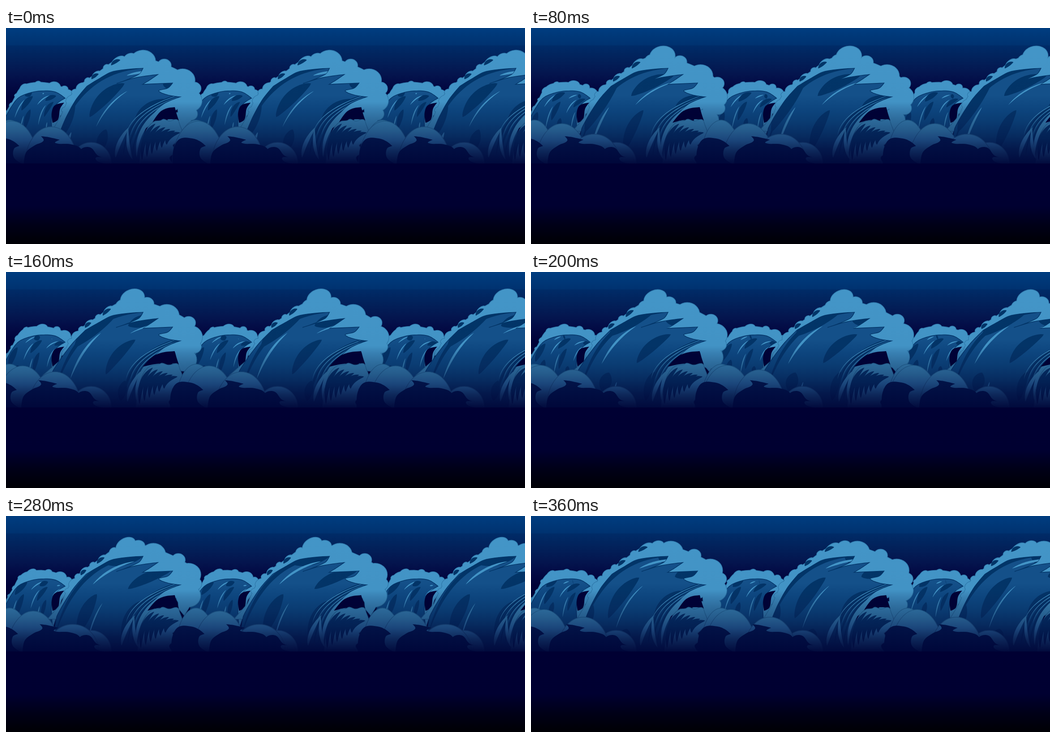
Recreate the animation shown at these times as an HTML page with a canvas. Size 1159 by 483 pixels, loop 400 ms.

```html
<!DOCTYPE html>
<html lang="en">
<head>
<meta charset="utf-8">
<title>Night waves</title>
<style>
  html, body { margin: 0; width: 100%; height: 100%; overflow: hidden; background: #000032; }
  canvas { display: block; }
</style>
</head>
<body>
<canvas id="sea" width="1159" height="483"></canvas>
<script>
const ctx = document.getElementById('sea').getContext('2d');
const W = 1159, H = 483, TILE = 416.4, FLOOR = 303, STEP = 40, COUNT = 10;

const mod = (a, n) => ((a % n) + n) % n;
const clamp = v => Math.max(0, Math.min(1, v));
const mix = (a, b, t) => a + (b - a) * t;
const points = text => text.split(' ').map(s => s.split(',').map(parseFloat));

// Colours depend on height only
function shade(stops, end = FLOOR) {
  const g = ctx.createLinearGradient(0, 0, 0, end);
  stops.forEach(([y, color]) => g.addColorStop(y / end, color));
  return g;
}
const light = shade([[0, '#4496c8'], [165, '#4293c5'], [182, '#387fb1'], [205, '#2d6b9b'], [228, '#255b8b'], [250, '#1b467b'], [275, '#0d2759'], [303, '#020b3d']]);
const edge = shade([[0, '#327eb1'], [165, '#2f79ab'], [205, '#205986'], [240, '#163f70'], [303, '#020b3d']]);
const mid = shade([[0, '#155089'], [150, '#145089'], [180, '#0d457e'], [210, '#0a3b71'], [240, '#072c60'], [270, '#04194c'], [303, '#010a3c']]);
const dark = shade([[0, '#003669'], [165, '#033467'], [210, '#052c60'], [245, '#032154'], [280, '#021144'], [303, '#01093a']]);
const deep = shade([[0, '#031548'], [245, '#021347'], [303, '#00073a']]);
const sky = shade([[0, '#003d80'], [18, '#003878'], [38, '#003270'], [40, '#002b67'], [65, '#02235c'], [100, '#04164f'], [125, '#030b45'], [155, '#000238'], [200, '#000235'], [303, '#000033'], [398, '#000031'], [440, '#000018'], [483, '#000004']], H);

// Closed smooth outline; "!" marks a sharp corner
function outline(text) {
  const pts = points(text), sharp = text.split(' ').map(s => s.endsWith('!')), n = pts.length, out = [];
  const pull = (i, reach) => {
    if (sharp[i]) return [0, 0];
    const a = pts[(i + n - 1) % n], b = pts[(i + 1) % n];
    const k = reach / Math.hypot(b[0] - a[0], b[1] - a[1]);
    return [(b[0] - a[0]) * k, (b[1] - a[1]) * k];
  };
  for (let i = 0; i < n; i++) {
    const j = (i + 1) % n, a = pts[i], b = pts[j];
    const reach = Math.hypot(b[0] - a[0], b[1] - a[1]) * 0.34, u = pull(i, reach), v = pull(j, reach);
    for (let t = 0; t < 1; t += 0.125) {
      const s = 1 - t;
      out.push([0, 1].map(c => s * s * s * a[c] + 3 * s * s * t * (a[c] + u[c])
        + 3 * s * t * t * (b[c] - v[c]) + t * t * t * b[c]));
    }
  }
  return out;
}

function trace(poly) {
  ctx.beginPath();
  poly.forEach(p => ctx.lineTo(p[0], p[1]));
  ctx.closePath();
}
function fill(poly, color, line) {
  trace(poly);
  ctx.fillStyle = color;
  ctx.fill();
  if (line) {
    ctx.strokeStyle = line;
    ctx.lineWidth = 1.4;
    ctx.stroke();
  }
}

// Tapered streak on a part of a quadratic curve
function leaf([x0, y0, cx, cy, x1, y1], w, color, from = 0, to = 1) {
  const up = [], down = [];
  for (let i = 0; i <= 24; i++) {
    const t = mix(from, to, i / 24), s = 1 - t;
    const x = s * s * x0 + 2 * s * t * cx + t * t * x1, y = s * s * y0 + 2 * s * t * cy + t * t * y1;
    const dx = s * (cx - x0) + t * (x1 - cx), dy = s * (cy - y0) + t * (y1 - cy);
    const r = w / 2 * Math.pow(Math.max(0, Math.sin(Math.PI * i / 24)), 0.7) / (Math.hypot(dx, dy) || 1);
    up.push([x - dy * r, y + dx * r]);
    down.unshift([x + dy * r, y - dx * r]);
  }
  fill(up.concat(down), color);
}

// Water climbs a lane: the head runs ahead, the tail follows to the tip
function flow(lane, n, start, w, color) {
  for (let turn = 0; turn < 2; turn++) {
    const age = mod(n - start, COUNT) / COUNT + turn;
    const head = Math.min(1, 0.1 + 1.1 * age), tail = Math.max(0, 1.2 * age - 0.4);
    if (tail < head) leaf(lane, w, color, tail, head);
  }
}

// Position and inward normal on a foam edge
function along(arc, p) {
  const q = Math.max(0, Math.min(arc.length - 1.001, p + arc.offset));
  const i = Math.floor(q), t = q - i;
  const [a, b, c, d] = [-1, 0, 1, 2].map(k => arc[Math.max(0, Math.min(arc.length - 1, i + k))]);
  const pos = [0, 1].map(k => b[k] + t * (c[k] - a[k]) / 2
    + t * t * (a[k] - 2.5 * b[k] + 2 * c[k] - d[k] / 2) + t * t * t * (1.5 * (b[k] - c[k]) + (d[k] - a[k]) / 2));
  const dx = mix(c[0] - a[0], d[0] - b[0], t), dy = mix(c[1] - a[1], d[1] - b[1], t), len = Math.hypot(dx, dy);
  return { x: pos[0], y: pos[1], nx: dy / len, ny: -dx / len };
}
function inset(arc, p, depth) {
  const a = along(arc, p);
  return [a.x + a.nx * depth, a.y + a.ny * depth];
}

// One lump spacing of foam passes along the edge in each loop
function foam(arc, n, tail, size, lift) {
  const first = -arc.offset, last = arc.length - 1 - arc.offset, rim = [];
  for (let p = first; p <= last; p += 0.1) rim.push(inset(arc, p, size * mix(0.4, 0.14, clamp(p * 2))));
  const shapes = [() => trace(rim.concat(tail))];
  for (let k = first; k < last; k += 0.5) {
    const p = k + mod(n + 1, COUNT) / COUNT;
    if (p > last - 0.4) continue;
    const main = Number.isInteger(k), ahead = Math.max(0, p);
    const r = size * (main ? 1 : 0.55) * Math.max(0.28, 1 / (1 + 0.9 * ahead * ahead));
    const [x, y] = inset(arc, p, r * 0.9), stretch = 1 + 0.45 * clamp(p);
    const rise = main && p > 0 && p < 1 ? lift * Math.sin(Math.PI * p) : 0;
    shapes.push(() => {
      ctx.beginPath();
      ctx.ellipse(x, y - rise, r * stretch, r * 0.92, -0.7 * clamp(p), 0, 7);
    });
  }
  ctx.strokeStyle = edge;
  ctx.lineWidth = 2.6;
  shapes.forEach(shape => { shape(); ctx.stroke(); });
  ctx.fillStyle = light;
  shapes.forEach(shape => { shape(); ctx.fill(); });
}

const bigArc = Object.assign(points('408,226 434,168 417,104 318,58 253,65 203,97 165,124 140,152 120,195'), { offset: 3 });
const smallArc = Object.assign(points('128,190 149,150 115,123 42,125 12,166 -6,196'), { offset: 2 });
const bigBody = outline('124,225! 137,195 158,158 181,130! 205,115 240,97 306,90! 296,104 247,124! 290,111 339,104! 320,117 305,126! 372,123! 362,134 342,142 389,154! 355,168 330,190 312,222 300,303! 110,303!');
const hole = outline('327,212! 343,189 358,180 377,177! 381,192 386,207! 370,204 346,206');
const smallBody = outline('-4,205! 12,176 28,156 50,146 75,141 110,143 132,157! 113,170 102,192 104,250! -4,250!');
const cave = outline('104,212! 102,190 109,173 130,167! 121,180 116,205');
const splash = outline('298,303! 304,262 312,232 324,214 334,208! 345,207 352,204 365,208 382,205 388,216 394,238 385,250 372,262! 376,278 365,290 372,303!');
const rocks = [
  '-44,303! -42,270 -28,248 0,247 18,254 30,264! 18,270 18,290 35,303!',
  '40,303! 45,278 65,262 84,252 78,242! 95,244 120,250! 110,257 145,260 168,271 158,282! 172,268 190,268 205,285 222,291! 200,292 222,303!'
].map(outline);
const tips = points('306,90 339,104 372,123 388,154');

// Lanes fan out from the foot of the wave to the tips of its lip
function bigLane(i) {
  const k = Math.floor(i), a = tips[k], b = tips[Math.min(3, k + 1)], t = i - k;
  return [112 + 48 * i, 258 + 10 * i, 162 + 36 * i, 92 + 26 * i, mix(a[0], b[0], t), mix(a[1], b[1], t)];
}
const smallLane = i => [4 + 19 * i, 226, 16 + 18 * i, 158, 58 + 18 * i, 144 + 0.9 * i * i];

// The curl opens to the left and closes again in each loop
const open = n => (1 - Math.cos(2 * Math.PI * (n + 0.5) / COUNT)) / 2;

function drawSmall(n) {
  foam(smallArc, n, [[-6, 250], [104, 250]], 14, 2);
  fill(smallBody, mid, dark);
  ctx.save();
  trace(smallBody);
  ctx.clip();
  for (let i = 0; i < 5; i++) {
    flow(smallLane(i), n, i * 3.7, 13 - i, dark);
    flow(smallLane(i + 0.5), n, i * 3.7 + 5, 2.5, light);
  }
  ctx.restore();
  fill(cave, sky);
}

function drawBig(n) {
  const gap = open(n);
  foam(bigArc, n, [[104 - 20 * gap, 230], [300, 230], [384, 180], [386, 207]], 27, 17);
  for (let k = 1; k < 3; k++) {
    const p = k + mod(n + 1, COUNT) / COUNT;
    leaf([...inset(bigArc, p + 0.3, 8), ...inset(bigArc, p + 0.1, 3), ...inset(bigArc, p - 0.1, 7)], 8, dark);
  }
  const body = bigBody.map(([x, y]) => [x - 22 * gap * clamp((300 - x) / 180) * clamp((y - 100) / 120), y]);
  fill(body, mid, dark);
  ctx.save();
  trace(body);
  ctx.clip();
  leaf(bigLane(0), 9, dark);
  [-2, 4.5, -1, 3].forEach((start, i) => flow(bigLane(i), n, start, 31 - 4 * i, dark));
  flow(bigLane(0.5), n, 0, 5, light);
  flow(bigLane(1.5), n, 5, 3, light);
  for (let i = 0; i < 4; i++) {
    const x = 262 + i * 10, y = 186 + i * 3;
    leaf([x, 285, x + 8, y, 386, 148 + i * 4], 7 - i, dark);
    leaf([x + 6, 240, x + 16, y, 384, 150 + i * 4], 1.6, light);
  }
  const x = 244 + 28 * gap;
  leaf([x, 290, x + 2, 258, x + 30, 222], 9, light);
  leaf([x + 28, 224, x + 24, 268, x + 38, 294], 7, light);
  ctx.restore();
  leaf([292, 290, 288 - 6 * gap, 207, 382, 161], 9, light);
  fill(hole.map(([x, y]) => [x - 22 * gap * clamp((378 - x) / 50), y]), sky);
}

function drawSplash(n) {
  const gap = open(n);
  fill(splash.map(([x, y]) => [x - 8 * gap * clamp((380 - x) / 60), y]), light, edge);
  for (let i = 0; i < 6; i++) {
    const x = 304 + i * 11 - 6 * gap;
    leaf([x, 296 - i * 7, x - 2, 238, x + 30, 214 + i * 4], 11, dark);
  }
}

function mound(x, top, rx) {
  ctx.beginPath();
  ctx.ellipse(x, FLOOR, rx, FLOOR - top, 0, Math.PI, 2 * Math.PI);
  ctx.fillStyle = light;
  ctx.fill();
  ctx.strokeStyle = edge;
  ctx.lineWidth = 1.4;
  ctx.stroke();
}

// Foam mounds rise on the right and drift to the left
function drawBase(n) {
  mound(8, 206, 46);
  mound(190, 256, 45);
  [mod(n + 4, COUNT), mod(n - 0.5, COUNT)].sort((a, b) => b - a)
    .forEach(age => mound(165 - 16 * age, 205 + 50 * Math.exp(-age / 3.5), 58));
  const sway = 6 * open(n);
  rocks.forEach(rock => fill(rock.map(([x, y]) => [x - sway, y]), deep));
}

function draw(n) {
  ctx.fillStyle = sky;
  ctx.fillRect(0, 0, W, H);
  ctx.save();
  ctx.beginPath();
  ctx.rect(0, 0, W, FLOOR);
  ctx.clip();
  ctx.fillStyle = deep;
  ctx.fillRect(0, 250, W, FLOOR - 250);
  for (const layer of [drawSmall, drawBig, drawSplash, drawBase]) {
    for (let i = 0; i < 3; i++) {
      ctx.save();
      ctx.translate(i * TILE, 0);
      layer(n);
      ctx.restore();
    }
  }
  ctx.restore();
}

let shown = -1;
function tick() {
  const n = Math.floor(performance.now() / STEP) % COUNT;
  if (n !== shown) draw(shown = n);
  requestAnimationFrame(tick);
}
tick();
</script>
</body>
</html>
```
